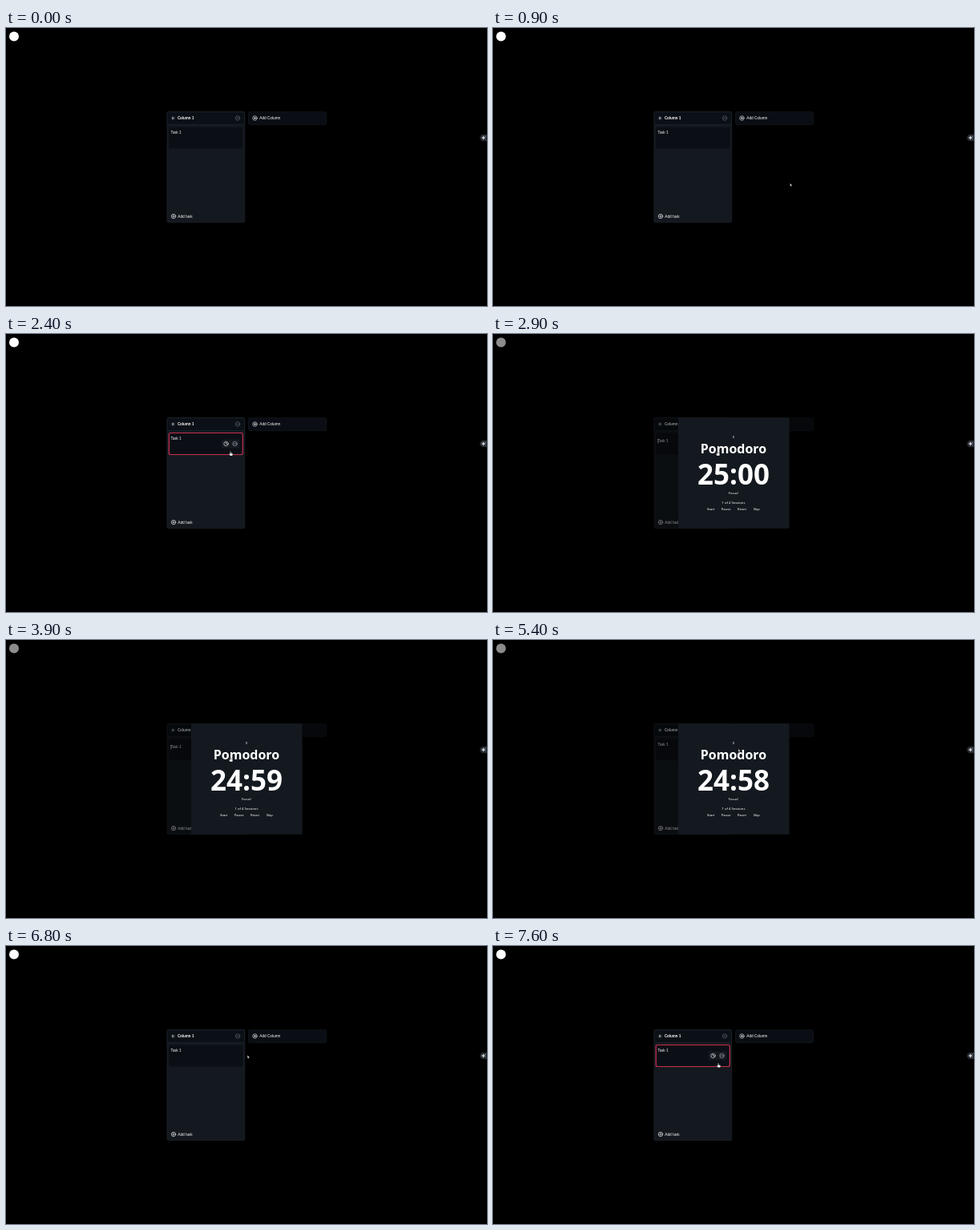
Write an HTML page that moves like this. It is 600 px wide and 347 px high and loops after 8 s.

```html
<!DOCTYPE html>
<html lang="en">
<head>
<meta charset="utf-8">
<title>Task board with timer</title>
<style>
  html, body { margin: 0; width: 100%; height: 100%; overflow: hidden; background: #000; }
  svg { display: block; width: 100%; height: 100%; }
  text { fill: #fff; font: 4.8px Lato, sans-serif; }
  .bold { font-weight: 700; }
  #modal text { font: 4.2px "Noto Sans", "Open Sans", sans-serif; text-anchor: middle; }
  #modal .title { font-size: 16px; font-weight: 700; }
  #modal .clock { font-size: 35px; font-weight: 700; }
  .icon { fill: none; stroke: #e8eaed; stroke-width: .7; stroke-linecap: round; }
  .dim { stroke: #626870; }
</style>
</head>
<body>
<svg viewBox="0 0 600 347">
  <defs>
    <g id="plus"><circle r="2.7"/><path d="M-1.2 0h2.4M0-1.2v2.4"/></g>
    <g id="minus"><circle r="2.7"/><path d="M-1.1 0h2.2"/></g>
    <g id="timer"><circle r="2.7"/><path d="M0-1.5V0l1.1.5"/></g>
  </defs>

  <rect width="600" height="347"/>
  <circle cx="10" cy="10.5" r="6" fill="#fff"/>

  <!-- Column -->
  <rect x="201" y="104.5" width="96.8" height="138" rx="1.5" fill="#14191f" stroke="#1d242b" stroke-width=".7"/>
  <rect x="201.3" y="104.8" width="96.2" height="15.7" rx="1.5" fill="#0b1016" stroke="#1b222a" stroke-width=".8"/>
  <circle cx="208.3" cy="112.5" r="3.2" fill="#151b21"/>
  <text class="bold" x="208.3" y="114.1" text-anchor="middle" style="font-size:4.4px">0</text>
  <text class="bold" x="214" y="114.2">Column 1</text>
  <use href="#minus" class="icon dim" x="289" y="112.5"/>
  <use href="#plus" class="icon" x="209" y="235"/>
  <text x="214.2" y="236.7">Add task</text>

  <!-- Task card -->
  <rect id="card" x="203.3" y="123.5" width="92" height="27" rx="2" fill="#0b0f15"/>
  <text id="task" x="205.6">Task 1</text>
  <rect id="caret" x="205.6" y="131" width=".6" height="5.6" fill="#fff"/>
  <g id="actions">
    <rect x="268.8" y="131.5" width="22.5" height="11" rx="1.5" fill="#151a20"/>
    <use href="#timer" class="icon" x="274.5" y="137"/>
    <use href="#minus" class="icon" x="285.5" y="137" style="stroke:#a3a8ae"/>
  </g>

  <!-- Add column button -->
  <rect x="302.5" y="104.7" width="97" height="16" rx="1.8" fill="#0a0e14" stroke="#141a20" stroke-width=".7"/>
  <use href="#plus" class="icon" x="310.5" y="112.5"/>
  <text x="316.2" y="114.3">Add Column</text>

  <g id="modal">
    <rect width="600" height="347" opacity=".45"/>
    <rect x="231" y="104.3" width="138.5" height="138.5" rx="1" fill="#13191f"/>
    <text x="300" y="130.3">X</text>
    <text class="title" x="300" y="149.2">Pomodoro</text>
    <text class="clock" id="clock" x="300" y="188.2"></text>
    <text x="300" y="200.3">Focus!</text>
    <text x="300" y="211.6">1 of 4 Sessions</text>
    <text x="271.7" y="220.4">Start</text>
    <text x="290.6" y="220.4">Pause</text>
    <text x="310.5" y="220.4">Reset</text>
    <text x="328.8" y="220.4">Skip</text>
  </g>

  <!-- Side tab -->
  <path d="M600 132.8h-4.8a4.2 4.2 0 0 0 0 8.4h4.8z" fill="#25272e"/>
  <path d="M595.5 134.5l.7 1.8 1.8.7-1.8.7-.7 1.8-.7-1.8-1.8-.7 1.8-.7zM597.8 134.5v1.6M597 135.3h1.6M597.8 138v1.4" fill="#d9dbe6" stroke="#d9dbe6" stroke-width=".3"/>

  <g id="cursor" fill="#fff" stroke="#000" stroke-width=".4">
    <path id="arrow" d="M0 0v3.9l.9-.8.6 1.4.7-.3-.6-1.3h1.2z"/>
    <path id="hand" d="M-.6.3Q0-.4.6.3V2l1.9.5q.5.2.4.8L2.5 5.5H-.5L-2 3.3q0-.8.8-.5l.6.5z"/>
  </g>
</svg>
<script>
const LOOP = 8000, STEP = 100;
const OPEN = 2900, CLOSE = 5500, EDIT_END = 4800;

// Pointer path: time, x, y
const path = [
  [400, 470, 207], [500, 400.5, 206.5], [600, 400.5, 206.5], [1500, 310.5, 168],
  [1700, 287, 159.5], [2100, 275, 139], [2200, 275, 139], [2400, 280, 146.6],
  [4700, 280, 146.6], [5300, 306, 135.8], [6700, 306, 135.8],
  [7300, 277, 139], [7600, 281, 146.3], [LOOP, 281, 146.3]
];

const el = id => document.getElementById(id);
const show = (id, on) => el(id).style.display = on ? "" : "none";
const between = (v, a, b) => v >= a && v < b;

function pointerAt(t) {
  const i = path.findIndex(key => key[0] > t);
  if (i <= 0) return path[0].slice(1);
  const [t0, x0, y0] = path[i - 1], [t1, x1, y1] = path[i];
  const k = (t - t0) / (t1 - t0);
  return [x0 + (x1 - x0) * k, y0 + (y1 - y0) * k];
}

function draw(now) {
  const t = Math.floor(now % LOOP / STEP) * STEP;
  const [x, y] = pointerAt(t);
  const open = between(t, OPEN, CLOSE);
  const editing = between(t, OPEN, EDIT_END);
  const hover = !open && between(x, 203, 296) && between(y, 123, 151);
  const hand = hover || between(t, OPEN, 4200);

  el("card").setAttribute("stroke", hover ? "#c92e50" : "#10161c");
  el("card").setAttribute("stroke-width", hover ? 1.2 : .5);
  show("actions", hover);
  el("task").setAttribute("y", editing ? 135.3 : 132.2);
  show("caret", between(t, OPEN, 3400) || between(t, 3900, 4500));

  show("modal", open);
  el("clock").textContent = t < 3900 ? "25:00" : t < 4900 ? "24:59" : "24:58";

  show("cursor", t >= path[0][0]);
  el("cursor").setAttribute("transform", `translate(${x} ${y})`);
  show("hand", hand);
  show("arrow", !hand);
}

const start = performance.now();
function tick() {
  draw(performance.now() - start);
  requestAnimationFrame(tick);
}
tick();
</script>
</body>
</html>
```
